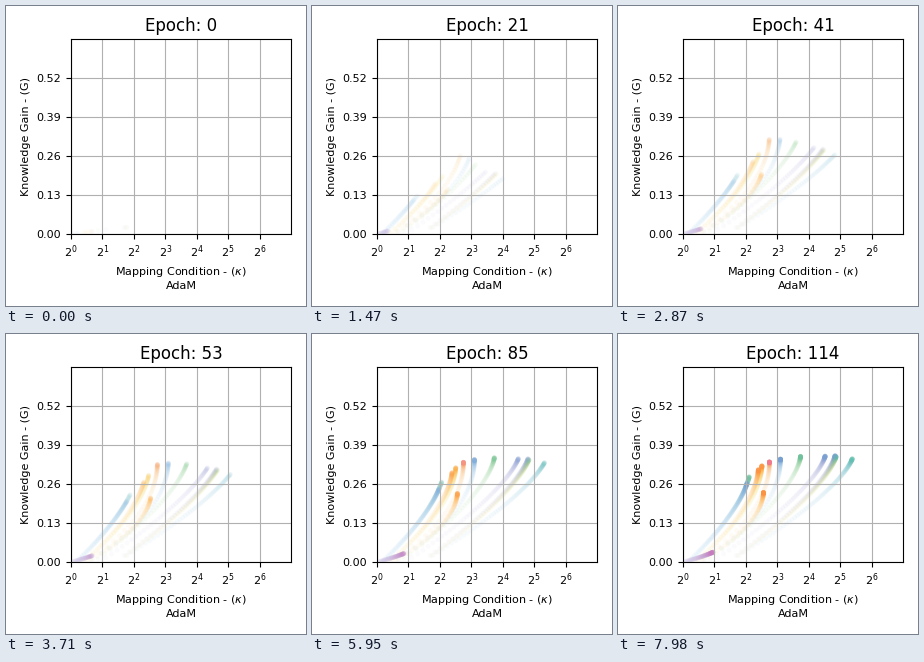
Write a matplotlib script that moves like this. It is 300 by 300 pixels and loops after 8 s.

```python
import numpy as np
import matplotlib.pyplot as plt
from matplotlib.animation import FuncAnimation
from matplotlib.colors import to_rgb

LOOP, STEP, EPOCH_MS = 8000, 40, 70
FRAMES = LOOP // STEP
LAST = 114
EPOCHS = np.arange(LAST + 1)

COLORS = {
    "sky": "#a3d2f2", "yellow": "#fbe95a", "violet": "#c6b6e4",
    "mint": "#aadfa2", "amber": "#ffcb66",
    "teal": "#5fc0ae", "blue": "#76a0d2", "green": "#70c29c",
    "orange": "#fb9344", "pink": "#f07896", "purple": "#c678bd",
}

# Each layer: first and final condition (log2), final gain, early and late colour
LAYERS = [
    (1.78, 5.41, 0.353, "sky", "teal"),
    (1.75, 4.88, 0.357, "yellow", "teal"),
    (1.69, 4.85, 0.360, "violet", "blue"),
    (1.11, 4.53, 0.357, "violet", "blue"),
    (0.86, 3.74, 0.353, "mint", "green"),
    (0.67, 3.10, 0.343, "sky", "blue"),
    (0.60, 2.75, 0.333, "amber", "pink"),
    (0.41, 2.51, 0.323, "yellow", "orange"),
    (0.48, 2.40, 0.313, "amber", "orange"),
    (0.67, 2.56, 0.233, "amber", "orange"),
    (0.22, 2.13, 0.300, "sky", "green"),
    (0.16, 2.07, 0.280, "sky", "blue"),
    (0.03, 1.10, 0.043, "violet", "purple"),
]


def trace(start, end, gain):
    """Both values decay towards their limits, the condition faster."""
    d = end - 2.75
    tau = 14 + 6.5 * max(d, 0) + 40 * max(-d, 0)
    power = 1.4 + 0.7 * np.exp(-3 * (d - 0.2) ** 2)
    rest = np.exp(-EPOCHS / tau)
    x = end - (end - start) * rest ** power
    y = gain - (gain - 0.0125 * start) * rest
    return np.column_stack([x, y])


def shades(early, late):
    t = EPOCHS[:, None] / LAST
    a, b = (np.array(to_rgb(COLORS[c])) for c in (early, late))
    mix = t ** 1.2
    return np.hstack([(1 - mix) * a + mix * b, 0.05 + 0.09 * np.sqrt(t)])


# Epoch-major order, so later dots lie on top
spots = np.stack([trace(*layer[:3]) for layer in LAYERS], axis=1)
colors = np.stack([shades(*layer[3:]) for layer in LAYERS], axis=1)

fig = plt.figure(figsize=(3, 3), dpi=100)
ax = fig.add_axes([65 / 300, 72 / 300, 220 / 300, 195 / 300])
ax.set_xlim(0, 7)
ax.set_ylim(0, 0.65)
ax.set_xticks(range(7), [f"$2^{n}$" for n in range(7)])
ax.set_yticks([0.13 * n for n in range(5)], [f"{0.13 * n:.2f}" for n in range(5)])
ax.tick_params(labelsize=8)
ax.set_xlabel("Mapping Condition - ($\\kappa$)\nAdaM", fontsize=8, labelpad=3.3)
ax.set_ylabel("Knowledge Gain - (G)", fontsize=8)
ax.grid(True)
title = ax.set_title("Epoch: 0", fontsize=12)
dots = ax.scatter([], [], s=12, linewidths=0)


def update(frame):
    epoch = min((frame * STEP + 30) // EPOCH_MS, LAST)
    title.set_text(f"Epoch: {epoch}")
    dots.set_offsets(spots[:epoch + 1].reshape(-1, 2))
    dots.set_facecolors(colors[:epoch + 1].reshape(-1, 4))
    return title, dots


anim = FuncAnimation(fig, update, frames=FRAMES, interval=STEP,
                     repeat=True, repeat_delay=0, blit=False)
plt.show()
```
